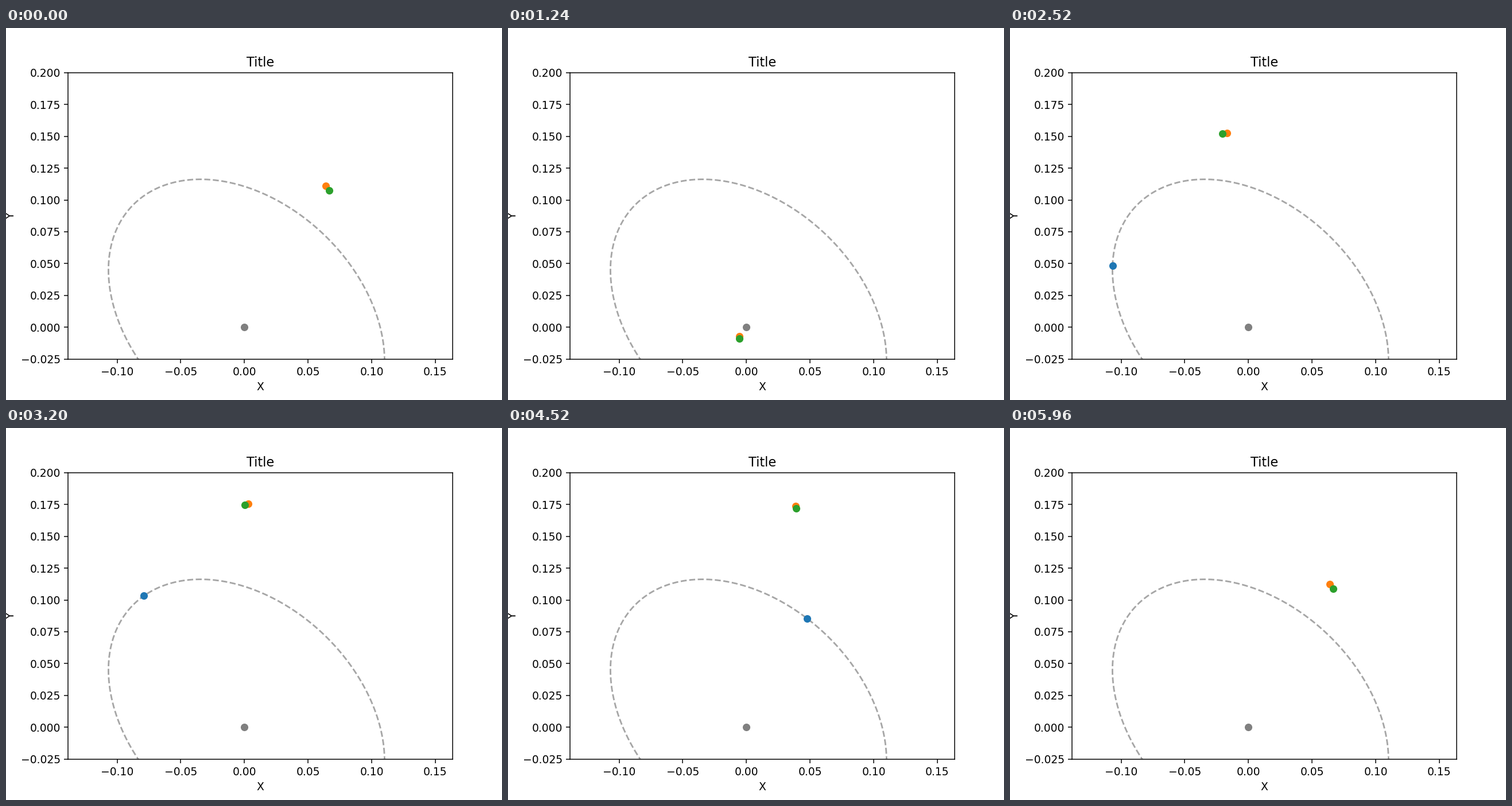
These frames come from a looping animation (864 px wide and 648 px high, 5980 ms). A matplotlib script:

```python
import numpy as np
import matplotlib.pyplot as plt
from matplotlib.animation import FuncAnimation

FRAMES = 299
PERI_FRAME = 61.59            # time of closest approach, in frames
MAJOR = (-0.01644, -0.09411)  # projected semi-major axis, towards pericentre
MINOR = (-0.10773, 0.05073)   # projected in-plane normal, before sqrt(1 - e^2)
BODIES = [(0.1, "C0"), (0.9, "C1"), (0.8839, "C2")]


def orbit(frame, e):
    """Position on a Kepler orbit of eccentricity e."""
    m = 2 * np.pi * (np.asarray(frame, float) - PERI_FRAME) / FRAMES
    m = m % (2 * np.pi)
    ecc = np.full_like(m, np.pi)
    for _ in range(40):
        ecc = ecc - (ecc - e * np.sin(ecc) - m) / (1 - e * np.cos(ecc))
    u = np.cos(ecc) - e
    v = np.sqrt(1 - e * e) * np.sin(ecc)
    return MAJOR[0] * u + MINOR[0] * v, MAJOR[1] * u + MINOR[1] * v


fig = plt.figure(figsize=(6.4, 4.8), dpi=135)
ax = fig.add_axes([0.125, 0.11, 0.775, 0.77])
ax.set_xlim(-0.13857, 0.16338)
ax.set_ylim(-0.025, 0.2)
ax.set_title("Title")
ax.set_xlabel("X")
ax.set_ylabel("Y")

ax.plot(*orbit(np.linspace(0, FRAMES, 400), BODIES[0][0]),
        "--", color="gray", alpha=0.7)
ax.plot([0], [0], "o", color="gray")
dots = [ax.plot([], [], "o", color=color)[0] for _, color in BODIES]


def update(frame):
    for dot, (e, _) in zip(dots, BODIES):
        x, y = orbit([frame], e)
        dot.set_data(x, y)
    return dots


anim = FuncAnimation(fig, update, frames=FRAMES, interval=20,
                     repeat=True, repeat_delay=0, blit=False)
plt.show()
```
